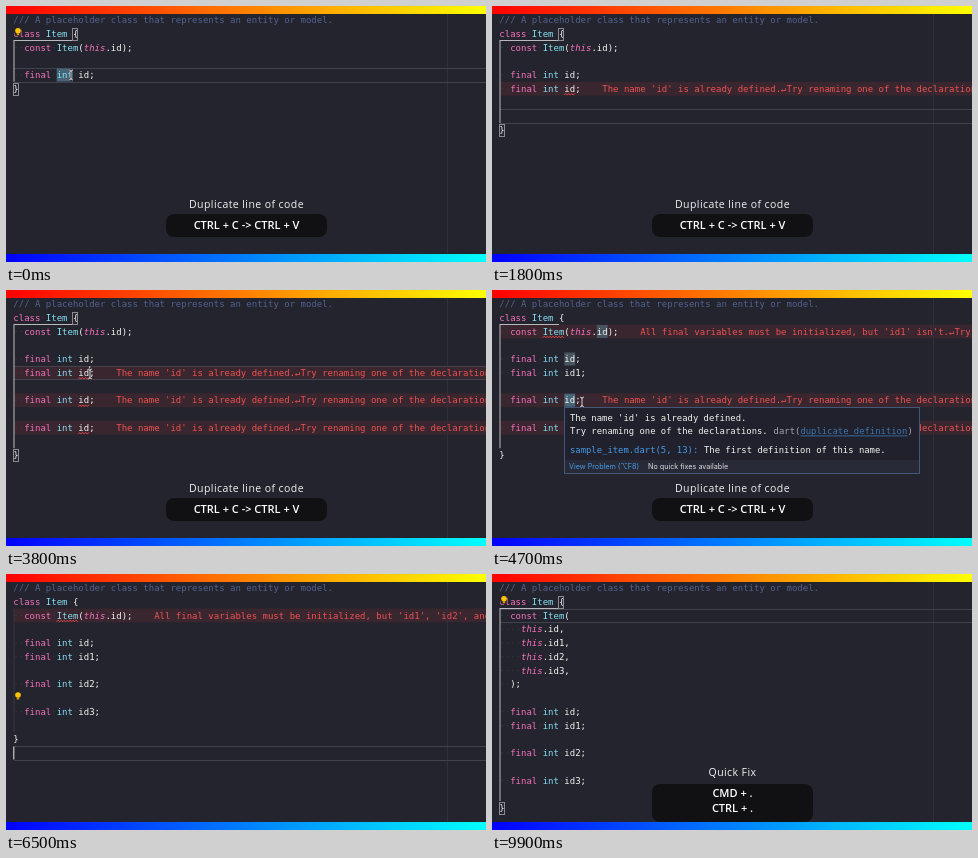
Recreate the animation shown at these times as an HTML page with a canvas. Size 480 by 256 pixels, loop 10000 ms.

```html
<!DOCTYPE html>
<html lang="en">
<head>
<meta charset="utf-8">
<style>
html, body { margin: 0; width: 100%; height: 100%; overflow: hidden; background: #24242e; }
canvas { display: block; }
</style>
</head>
<body>
<canvas id="stage" width="480" height="256"></canvas>
<script>
const ctx = document.getElementById('stage').getContext('2d');
const LOOP = 10000, CHAR = 5.418, LEFT = 7.3;
const MONO = '9px "DejaVu Sans Mono", monospace';
const BG = '#24242e', WHITE = '#f4f4f0', PINK = '#f672bd', CYAN = '#86e0f4', RED = '#ed5252';
const COLORS = { class: PINK, const: PINK, final: PINK, this: PINK, Item: CYAN, int: CYAN };
const SAMPLE = 'id,id1,,id2,,id3,';

// Editor states: start time, field lines, current row, selection [row, column, length]
const steps = [
  { at: 0, fields: 'id', row: 4, sel: [4, 8, 3] },
  { at: 700, fields: 'id', row: 4 },
  { at: 1200, fields: 'id,', row: 5 },
  { at: 1400, fields: 'id,id,', row: 6 },
  { at: 1700, fields: 'id,id,,', row: 7 },
  { at: 2200, fields: 'id,id,,id,', row: 8 },
  { at: 2500, fields: 'id,id,,id,,', row: 9 },
  { at: 2800, fields: 'id,id,,id,,id,', row: 10 },
  { at: 3700, fields: 'id,id,,id,,id,', row: 5, caret: 14 },
  { at: 4000, fields: 'id,id1,,id,,id,', row: 5, caret: 15 },
  { at: 4400, fields: 'id,id1,,id,,id,', row: 7, sel: [7, 12, 2] },
  { at: 5000, fields: 'id,id1,,id2,,id,', row: 7, caret: 15 },
  { at: 5300, fields: 'id,id1,,id2,,id,', row: 9, sel: [9, 12, 2] },
  { at: 5500, fields: SAMPLE, row: 9, caret: 15 },
  { at: 6000, fields: SAMPLE, row: 12, caret: 0 },
  { at: 7600, fields: SAMPLE, row: 2, caret: 10, sel: [2, 8, 4] },
  { at: 9300, fields: SAMPLE, row: 2, fixed: true }
];

// Pointer paths as [time, x, y]; the pointer hides between paths
const paths = [
  [[0, 65, 69], [300, 66, 69], [1000, 92, 70], [1200, 92, 70]],
  [[3000, 82, 112], [3200, 82, 99], [3600, 84, 84], [3900, 84, 84]],
  [[4200, 85, 98], [4400, 84, 111], [4700, 90, 112], [5000, 90, 112]],
  [[5100, 88, 122], [5300, 84, 139], [5500, 84, 139]],
  [[5700, 70, 155], [6000, 40, 180], [6200, 40, 180]],
  [[7200, 110, 110], [7600, 62, 42], [8000, 62, 42], [8500, 152, 86], [9300, 152, 86]]
];

const rowY = row => 14 + 13.75 * row;
const colX = col => LEFT + col * CHAR;
const ramp = (t, from, to) => Math.min(1, Math.max(0, (t - from) / (to - from)));

function rect(x, y, w, h, color) {
  ctx.fillStyle = color;
  ctx.fillRect(x, y, w, h);
}

function text(str, x, y, color, font = MONO) {
  ctx.font = font;
  ctx.fillStyle = color;
  ctx.fillText(str, x, y);
}

function codeLine(str, row) {
  const y = rowY(row) + 3;
  for (const { 0: token, index } of str.matchAll(/\/\/\/.*|\w+|./g)) {
    const x = colX(index);
    if (token === ' ') rect(x + 2.2, y - 3.5, 1, 1, '#3c3c49');
    else if (token.startsWith('///')) text(token, x, y, '#53628f');
    else text(token, x, y, COLORS[token] || WHITE, (token === 'this' ? 'italic ' : '') + MONO);
  }
}

function squiggle(row, col, length) {
  const y = rowY(row) + 5.5, end = colX(col + length);
  ctx.beginPath();
  for (let x = colX(col), i = 0; x <= end; x += 1.5, i++) ctx.lineTo(x, y + (i % 2 ? -0.8 : 0.8));
  ctx.strokeStyle = '#f04c4c';
  ctx.lineWidth = 0.9;
  ctx.stroke();
}

function bracketBox(row, col) {
  ctx.strokeStyle = '#8b8b91';
  ctx.lineWidth = 1;
  ctx.strokeRect(Math.floor(colX(col)) + 0.5, Math.round(rowY(row) - 6) + 0.5, 5, 12);
}

function buildDocument({ fields, fixed }) {
  const names = fields.split(',');
  const constructor = fixed
    ? ['  const Item(', ...names.filter(Boolean).map(n => `    this.${n},`), '  );']
    : ['  const Item(this.id);'];
  const lines = ['/// A placeholder class that represents an entity or model.', 'class Item {', ...constructor, ''];
  const first = lines.length;
  lines.push(...names.map(n => n && `  final int ${n};`), '}');

  const errors = [];
  names.forEach((name, i) => {
    if (name && names.indexOf(name) < i) errors.push({
      row: first + i, col: 12, length: 2,
      message: "The name 'id' is already defined.↵Try renaming one of the declarations."
    });
  });
  const extra = names.filter(n => /\d/.test(n)).map(n => `'${n}'`);
  if (extra.length && !fixed) {
    const list = extra.length < 3 ? extra.join(' and ') : `${extra[0]}, ${extra[1]}, and ${extra[2]}`;
    errors.push({
      row: 2, col: 8, length: 4,
      message: `All final variables must be initialized, but ${list} ${extra.length > 1 ? "aren't" : "isn't"}.↵Try adding initializers.`
    });
  }
  return { lines, errors };
}

function drawEditor(state) {
  const { lines, errors } = buildDocument(state);
  const { row, sel, caret } = state;
  const last = lines.length - 1, inside = row < last;
  const wordSelected = sel && caret === undefined;
  const idSelected = wordSelected && sel[2] === 2;

  for (const e of errors) rect(8, rowY(e.row) - 6.9, 472, 13.75, '#39262f');
  rect(441, 8, 1, 240, '#30303b');
  if (!idSelected) {
    rect(8, Math.round(rowY(row) - 7), 472, 1, '#42424e');
    rect(8, Math.round(rowY(row) + 6.5), 472, 1, '#42424e');
  }

  const guide = inside ? '#b9b9bd' : '#383844';
  rect(7.5, 34, 1, rowY(last) - 41, guide);
  if (inside) rect(8, 34, 59, 1, guide);

  const highlight = (r, c, n, color) => rect(colX(c), rowY(r) - 6.5, n * CHAR, 13, color);
  if (sel) highlight(...sel, caret === undefined ? '#486578' : '#48545f');
  if (idSelected) {
    highlight(2, 18, 2, '#465560');
    highlight(4, 12, 2, '#465560');
  }

  lines.forEach(codeLine);
  for (const e of errors) {
    text(e.message, colX(lines[e.row].length + 4), rowY(e.row) + 3, RED);
    if (!(idSelected && e.row === row)) squiggle(e.row, e.col, e.length);
  }
  if (inside && !idSelected) {
    bracketBox(1, 11);
    bracketBox(last, 0);
  }
  if (caret !== undefined) rect(colX(caret), rowY(row) - 6.5, 1, 13, '#e8e8e8');
}

function drawBulb(row) {
  const y = rowY(row) - 3;
  rect(8.5, y - 4, 6, 8, BG);
  ctx.fillStyle = '#ffc400';
  ctx.beginPath();
  ctx.arc(12, y, 2.8, 0, 7);
  ctx.fill();
  rect(10.8, y + 2.5, 2.4, 2, '#d89e00');
}

function drawPopup() {
  const small = '7.2px Inter, "DejaVu Sans", sans-serif', mono = MONO.replace('9px', '8.9px');
  const step = 8.9 * 0.602, x = 78;
  rect(72, 117, 356, 67, '#435879');
  rect(73, 118, 354, 65, '#20212c');
  rect(73, 170, 354, 13, '#292a37');
  text("The name 'id' is already defined.", x, 131, WHITE, mono);
  text('Try renaming one of the declarations.', x, 144, WHITE, mono);
  text('dart(', x + 38 * step, 144, '#a5a5ac', mono);
  text('duplicate_definition', x + 43 * step, 144, '#3f76ae', mono);
  rect(x + 43 * step, 145.5, 20 * step, 0.8, '#3f76ae');
  text(')', x + 63 * step, 144, '#a5a5ac', mono);
  text('sample_item.dart(5, 13):', x, 162.5, '#469be6', mono);
  text('The first definition of this name.', x + 25 * step, 162.5, WHITE, mono);
  text('View Problem (⌥F8)', 77, 179, '#469be6', small);
  text('No quick fixes available', 156, 179, '#dedee2', small);
}

function drawPointer(t) {
  const path = paths.find(p => t >= p[0][0] && t < p[p.length - 1][0]);
  if (!path) return;
  const i = path.findIndex(p => p[0] > t);
  const [t0, x0, y0] = path[i - 1], [t1, x1, y1] = path[i];
  const k = ramp(t, t0, t1), x = x0 + (x1 - x0) * k, y = y0 + (y1 - y0) * k;
  for (const [width, color] of [[2, '#22222a'], [1, '#d8d8dc']]) {
    ctx.beginPath();
    ctx.moveTo(x - 2, y - 5);
    ctx.quadraticCurveTo(x, y - 5, x, y - 3);
    ctx.lineTo(x, y + 3);
    ctx.quadraticCurveTo(x, y + 5, x - 2, y + 5);
    ctx.moveTo(x + 2, y - 5);
    ctx.quadraticCurveTo(x, y - 5, x, y - 3);
    ctx.moveTo(x, y + 3);
    ctx.quadraticCurveTo(x, y + 5, x + 2, y + 5);
    ctx.strokeStyle = color;
    ctx.lineWidth = width;
    ctx.stroke();
  }
}

function drawCaption(title, keys, top, alpha) {
  if (!alpha) return;
  ctx.globalAlpha = alpha;
  ctx.textAlign = 'center';
  ctx.letterSpacing = '0.42px';
  text(title, 240.5, 201.5, '#f2f2f2', '10.5px "Open Sans", sans-serif');
  ctx.letterSpacing = '0px';
  ctx.fillStyle = '#111114';
  ctx.beginPath();
  ctx.roundRect(160, top, 161, 8 + keys.length * 15, 8);
  ctx.fill();
  keys.forEach((key, i) => text(key, 240.5, top + 15 + i * 15 - (keys.length > 1 ? 2 : 0), '#fff', '600 11px "Open Sans", sans-serif'));
  ctx.textAlign = 'left';
  ctx.globalAlpha = 1;
}

function bar(y, from, to) {
  const gradient = ctx.createLinearGradient(0, 0, 480, 0);
  gradient.addColorStop(0, from);
  gradient.addColorStop(1, to);
  rect(0, y, 480, 8, gradient);
}

function draw(now) {
  const t = now % LOOP;
  rect(0, 0, 480, 256, BG);
  drawEditor(steps.findLast(s => s.at <= t));
  if (t < 300 || t >= 7800) drawBulb(1);
  else if (t >= 5600 && t < 6900) drawBulb(8);
  if (t >= 4600 && t < 5000) drawPopup();
  drawPointer(t);
  drawCaption('Duplicate line of code', ['CTRL + C -> CTRL + V'], 208, 1 - ramp(t, 5700, 6100));
  drawCaption('Quick Fix', ['CMD + .', 'CTRL + .'], 210, ramp(t, 7200, 7500));
  bar(0, '#f00', '#ff0');
  bar(248, '#00f', '#0ff');
  requestAnimationFrame(draw);
}
requestAnimationFrame(draw);
</script>
</body>
</html>
```
